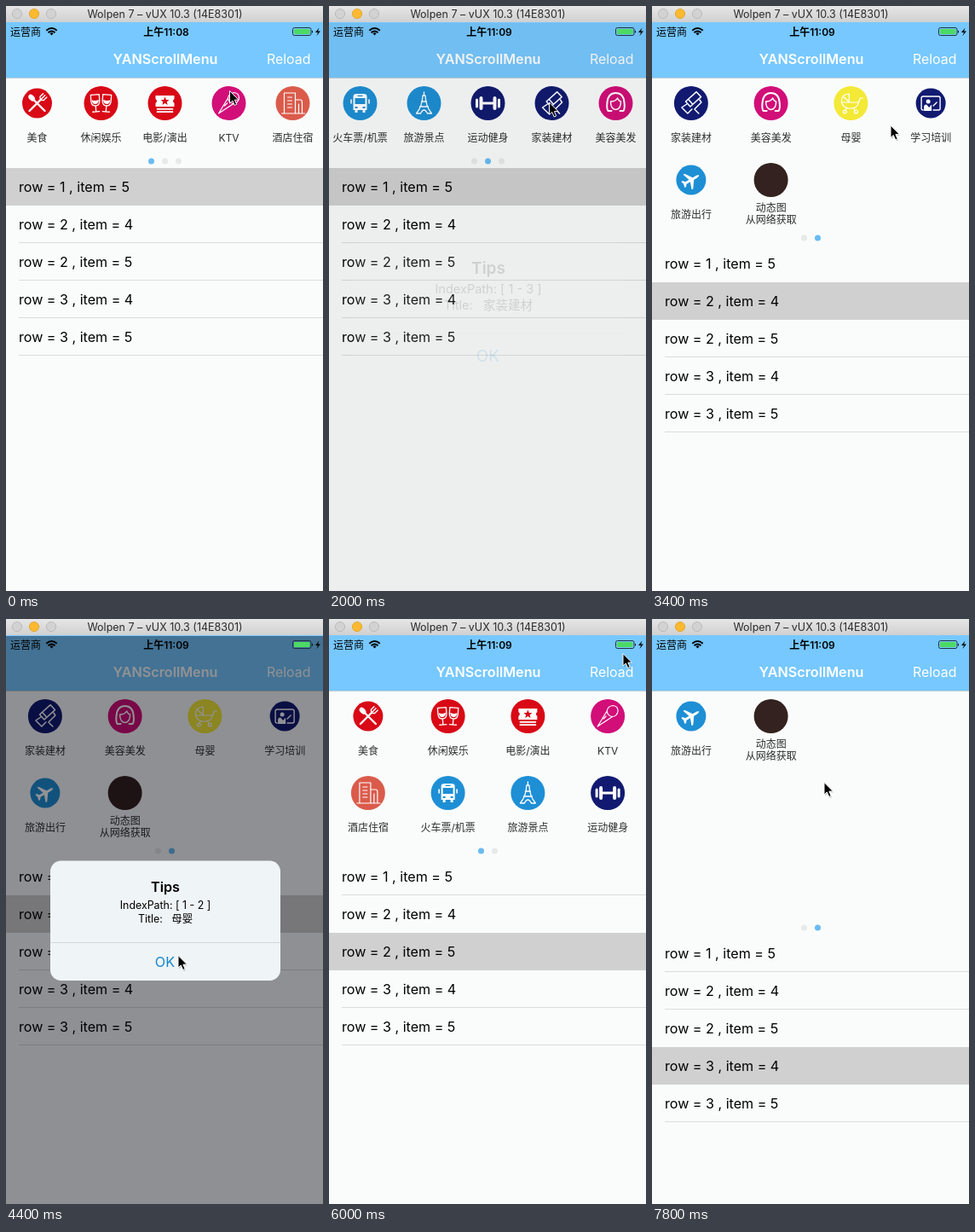
An HTML page for the animation above (8 s loop, 372 px wide and 686 px high).

```html
<!DOCTYPE html>
<html lang="zh">
<head>
<meta charset="utf-8">
<title>Scroll menu</title>
<style>
html, body { margin: 0; width: 100%; height: 100%; overflow: hidden; background: #fafcfc; }
svg { display: block; width: 100%; height: 100%; font-family: Inter, 'Noto Sans CJK SC', 'Noto Sans CJK', sans-serif; }
text { white-space: pre; }
.mid { text-anchor: middle; }
.label { font-size: 12px; fill: #2c2e2e; text-anchor: middle; }
.row { font-size: 16.1px; fill: #000; }
.line { fill: none; stroke: #fff; stroke-linecap: round; stroke-linejoin: round; }
</style>
</head>
<body>
<svg viewBox="0 0 372 686" preserveAspectRatio="xMinYMin meet">
  <defs>
    <linearGradient id="bar" x2="0" y2="1">
      <stop offset="0" stop-color="#e6e6e6"/><stop offset="1" stop-color="#d0d0d0"/>
    </linearGradient>
  </defs>
  <rect width="372" height="686" fill="#fafcfc"/>
  <g id="list"></g>
  <g id="menu"></g>
  <g id="dots"></g>
  <rect y="19" width="372" height="65" fill="#76c8ff"/>
  <rect y="84" width="372" height="1" fill="#c3cfd5"/>
  <text class="mid" x="187" y="68" font-size="16.2" font-weight="600" fill="#fff">YANScrollMenu</text>
  <text x="306" y="68" font-size="15.9" fill="#fff">Reload</text>
  <rect id="dim" y="20" width="372" height="666" fill="#020208"/>

  <rect width="372" height="19" fill="url(#bar)"/>
  <g stroke-width=".8">
    <circle cx="13" cy="9" r="5.6" fill="#d2d2d2" stroke="#b4b4b4"/>
    <circle cx="33" cy="9" r="5.6" fill="#fdb92f" stroke="#dfa023"/>
    <circle cx="53" cy="9" r="5.6" fill="#d2d2d2" stroke="#b4b4b4"/>
  </g>
  <text class="mid" x="186.5" y="14" font-size="12.5" fill="#2b2b2b">Wolpen 7 – vUX 10.3 (14E8301)</text>

  <text x="5" y="34.5" font-size="12">运营商</text>
  <g fill="none" stroke="#000" stroke-width="1.9">
    <path d="M47.300 28.800Q53.500 23.400 59.700 28.800M49.500 31.200Q53.500 27.700 57.500 31.200"/>
    <path d="M51.300 32L53.500 34.600L55.700 32Q53.500 30.500 51.300 32Z" fill="#000" stroke="none"/>
  </g>
  <text id="clock" class="mid" x="188" y="34.5" font-size="12" font-weight="600"></text>
  <rect x="336.5" y="25.5" width="21.5" height="9" rx="2" fill="none" stroke="#1d3343"/>
  <rect x="338" y="27" width="18.5" height="6" rx=".8" fill="#4cd964"/>
  <path d="M359 28.500q2 1.700 0 3.500z"/>
  <path d="M367.500 25.500L363 31H366L364.500 35L369 29.500H366Z"/>

  <g id="alert">
    <rect x="52" y="283.5" width="270" height="140.5" rx="12.5" fill="#eff4f6"/>
    <rect x="52" y="379" width="270" height="1" fill="#d3d9db"/>
    <g class="mid">
      <text x="187" y="319.5" font-size="16.2" font-weight="600">Tips</text>
      <text id="path" x="187" y="339.5" font-size="12.4"></text>
      <text id="name" x="187" y="355.5" font-size="12.4"></text>
      <text x="186.5" y="408" font-size="16.2" fill="#1788c9">OK</text>
    </g>
  </g>
  <g id="cursor">
    <path d="M1 2V16L4.300 13L6.700 18.500L9 17.400L6.800 12H11Z" opacity=".2"/>
    <path d="M0 0V14.500L3.300 11.500L5.700 17L8.200 15.900L5.900 10.600H10.500Z" stroke="#fff"/>
  </g>
</svg>
<script>
const LOOP = 8000, STEP = 200, PAGE_W = 375, ROW_H = 44, LINE_H = 90;
const $ = id => document.getElementById(id);
const line = (d, w = 1.4) => `<path class="line" d="${d}" stroke-width="${w}"/>`;
const solid = (d, c = '#fff') => `<path d="${d}" fill="${c}"/>`;
const turn = (deg, s, x = 0, y = 0) => `<g transform="translate(${x} ${y}) rotate(${deg})">${s}</g>`;

const RED = '#d90916', PINK = '#d20e78', BLUE = '#1e8fd5', NAVY = '#111a70';
const glass = line('M-5 -10H5L5 -3Q5 3 0 3Q-5 3 -5 -3ZM0 3V10M-4 10H4', 1.3) + solid('M-4 -4Q0 -2 4 -4Q4 1 0 1Q-4 1 -4 -4');

// label, colour, drawing, radius
const items = [
  ['美食', RED,
    line('M-5 -5L9 9M4 -4L-9 9', 2.4) + turn(-45, '<ellipse cy="-9" rx="3" ry="4.500" fill="#fff"/>') +
    turn(45, line('M-3 -13V-8Q0 -4 3 -8V-13M0 -13V-6', 1.4)), 17.5],
  ['休闲娱乐', RED, turn(-4, glass, -6.5) + turn(4, glass, 6.5)],
  ['电影/演出', RED,
    solid('M-11 -9H11V-5Q8 -2.500 11 0V4H-11V0Q-8 -2.500 -11 -5Z') +
    solid('M0 -7.500L1.400 -4H5L2.200 -1.600L3.200 2L0 0L-3.200 2L-2.200 -1.600L-5 -4H-1.400Z', RED) +
    line('M-9 6.800H9M-9 10.200H9', 1.7)],
  ['KTV', PINK,
    line('M-12 12L-1 -6Q0 -12 6 -12.500Q12 -12 12 -6Q11 0 5.500 0.500ZM-1 -6Q0 0 5.500 .5M-5 3L-2 0', 1.2)],
  ['酒店住宿', '#db5b4b',
    line('M-10 12V-12H3V12M3 -4H9Q11 -4 11 -1V12M-13 12H14M-6 -7H-1M-6 -3H-1M-6 1H-1M-6 5H-1M7 1V12', 1.2)],
  ['火车票/机票', BLUE,
    solid('M-8 -8Q-8 -11 -4 -11H4Q8 -11 8 -8V8H6V11H3V8H-3V11H-6V8H-8Z') +
    solid('M-6 -6H6V1H-6ZM-3 -9.300H3V-8H-3ZM-6 4H-3V6H-6ZM3 4H6V6H3Z', BLUE) +
    line('M-10.500 -4V0M10.500 -4V0', 1.6)],
  ['旅游景点', BLUE,
    line('M0 -13V-9M-1.500 -9Q-2 4 -9 12H-4Q0 4 4 12H9Q2 4 1.500 -9ZM-3 -2H3M-5 4H5', 1.3)],
  ['运动健身', NAVY,
    line('M-6 0H6', 3) + line('M-8 -6V6M8 -6V6', 4) + line('M-13 -4V4M13 -4V4', 3)],
  ['家装建材', NAVY,
    turn(-42, line('M-9 -4H8V4H-9ZM-5 -4V4', 1.5), 3, -5) +
    line('M-5 1L-11 5L-4 12L1 7M10 -4L12 -1L4 7L9 12', 1.5)],
  ['美容美发', PINK,
    line('M-9 9Q-11 6 -10 -1Q-9 -12 0 -12Q9 -12 10 -1Q11 6 9 9H5M-9 9H-5', 2) +
    line('M-6 -2Q0 -2 2 -6Q4 -2 6 -2Q6 7 0 7.500Q-6 7 -6 -2Z', 1.5)],
  ['母婴', '#f3e936',
    line('M-11 -1H9Q8 6 0 6H-3Q-9 5 -11 -1ZM-11 -1Q-11 -11 -2 -11V-1L-9 -8M9 -1L11 -6H14M-5 6L-7 9M3 6L5 9', 1.2) +
    line('M-9 10a2 2 0 1 0 4 0a2 2 0 1 0 -4 0M4 10a2 2 0 1 0 4 0a2 2 0 1 0 -4 0', 1.2)],
  ['学习培训', NAVY,
    line('M-9 8Q-11 8 -11 6V-6Q-11 -8 -9 -8H9Q11 -8 11 -6V6Q11 8 9 8H3M3 3L7 -1', 1.4) +
    '<circle cx="-3" cy="-2" r="2.500" fill="#fff"/>' + solid('M-8 9V4Q-8 1.500 -5 1.500L-2 5L1 1.500V9Z'), 17.5],
  ['旅游出行', BLUE,
    turn(60, solid('M0 -11Q1.500 -10 1.500 -6V-3L10 3V5L1.500 2V7L4 9V11L0 10L-4 11V9L-1.500 7V2L-10 5V3L-1.500 -3V-6Q-1.500 -10 0 -11Z')), 17.5],
  ['动态图\n从网络获取', '#33221f', '']
];
// rows and columns offered by each list entry
const options = [[1, 5], [2, 4], [2, 5], [3, 4], [3, 5]];

const label = s => s.split('\n').map((part, i, all) =>
  `<text class="label" y="${all.length > 1 ? 37.3 + 14 * i : 44.5}">${part}</text>`).join('');
$('menu').innerHTML = items.map(([name, color, art, r = 20]) =>
  `<g><circle r="${r}" fill="${color}"/>${art}${label(name)}</g>`).join('');
$('dots').innerHTML = '<circle r="3.5"/>'.repeat(3);
$('list').innerHTML = options.map(([r, n], i) =>
  `<g transform="translate(0 ${i * ROW_H})"><rect width="372" height="44" fill="#d0d0d0"/>` +
  `<rect x="15" y="43" width="357" height="1" fill="#d9dcdc"/>` +
  `<text class="row" x="15" y="27.8">row = ${r} , item = ${n}</text></g>`).join('');

const latest = (keys, t) => keys.filter(k => k[0] <= t).pop();
const listTop = rows => 190 + (rows - 1) * LINE_H;

function place(i, [rows, cols], page) {
  const size = rows * cols, slot = i % size;
  return [
    (Math.floor(i / size) - page) * PAGE_W + (slot % cols + .5) * PAGE_W / cols - 1,
    114 + Math.floor(slot / cols) * LINE_H
  ];
}

// Each user action adds its own keys to the tracks.
let menu = options[0], page = 0, pick = 0;
const pointer = [], pages = [[0, 0]], menus = [[0, menu]], picks = [[0, pick]], alerts = [];
const go = (t, x, y) => pointer.push([t, x, y]);

function tap(t, i) {
  const [x, y] = place(i, menu, page);
  go(t, x - 3, y - 1);
  go(t + 400, 202, 394.5);
  go(t + 600, 202, 394.5);
  alerts.push({ open: t, close: t + 600, page, index: i % (menu[0] * menu[1]), name: items[i][0] });
}

function swipe(t, to, x, y, time = 400) {
  const ends = [x + 90, x];
  if (to < page) ends.reverse();
  go(t, ends[0], y);
  go(t + time, ends[1], y);
  pages.push([t, page], [t + time, to]);
  page = to;
}

function choose(t, row) {
  pick = row;
  go(t, 200, listTop(menu[0]) + (row + .5) * ROW_H);
  picks.push([t, row]);
}

function reload(t) {
  const done = t + STEP;
  go(t, 345, 40.5);
  menu = options[pick];
  menus.push([done, menu]);
  pages.push([done, page], [done, 0]);
  page = 0;
}

go(0, 262.5, 99.5);
tap(400, 2);
swipe(1400, 1, 190, 140);
tap(2000, 8);
choose(2700, 1);
reload(2800);
swipe(3000, 1, 280, 140);
tap(4000, 10);
swipe(4800, 0, 204, 191.5);
choose(5600, 2);
reload(6000);
swipe(6400, 1, 204, 191.5, 200);
choose(7300, 3);
reload(7400);
swipe(7600, 1, 202, 191.5, 200);

function lerp(keys, t, col = 1) {
  const i = keys.findIndex(k => k[0] > t);
  if (i < 0) return keys[keys.length - 1][col];
  const a = keys[i - 1], b = keys[i];
  return a[col] + (b[col] - a[col]) * (t - a[0]) / (b[0] - a[0]);
}
const move = (el, x, y) => el.setAttribute('transform', `translate(${x} ${y})`);
const fade = (el, alpha) => el.setAttribute('opacity', alpha);

function drawMenu(t) {
  const grid = latest(menus, t)[1], [rows, cols] = grid, at = lerp(pages, t);
  [...$('menu').children].forEach((el, i) => move(el, ...place(i, grid, at)));
  const count = Math.ceil(items.length / (rows * cols));
  [...$('dots').children].forEach((el, i) => {
    move(el, 186.5 + (i - (count - 1) / 2) * 16, listTop(rows) - 8);
    el.setAttribute('fill', i === Math.round(at) ? '#69bbf3' : '#e8eaea');
    fade(el, +(i < count));
  });
  const on = latest(picks, t)[1];
  move($('list'), 0, listTop(rows));
  [...$('list').children].forEach((el, i) => {
    fade(el.children[0], +(i === on));
    fade(el.children[1], +(i !== on && i + 1 !== on));
  });
}

function drawAlert(t) {
  const now = alerts.find(a => t >= a.open && t <= a.close);
  const opening = now && t === now.open;
  const alpha = !now ? 0 : opening ? .12 : t === now.close ? .4 : 1;
  if (now) {
    $('path').textContent = `IndexPath: [ ${now.page} - ${now.index} ]`;
    $('name').textContent = `Title:   ${now.name}`;
  }
  fade($('alert'), alpha);
  fade($('dim'), alpha * .43);
  $('alert').setAttribute('transform',
    `translate(187 353.75) scale(${opening ? 1.175 : 1}) translate(-187 -353.75)`);
}

function draw(ms) {
  const t = Math.floor(ms % LOOP / STEP) * STEP;
  drawMenu(t);
  drawAlert(t);
  move($('cursor'), lerp(pointer, t), lerp(pointer, t, 2));
  $('clock').textContent = t < 1400 ? '上午11:08' : '上午11:09';
}

const start = performance.now();
function tick() {
  draw(performance.now() - start);
  requestAnimationFrame(tick);
}
tick();
</script>
</body>
</html>
```
